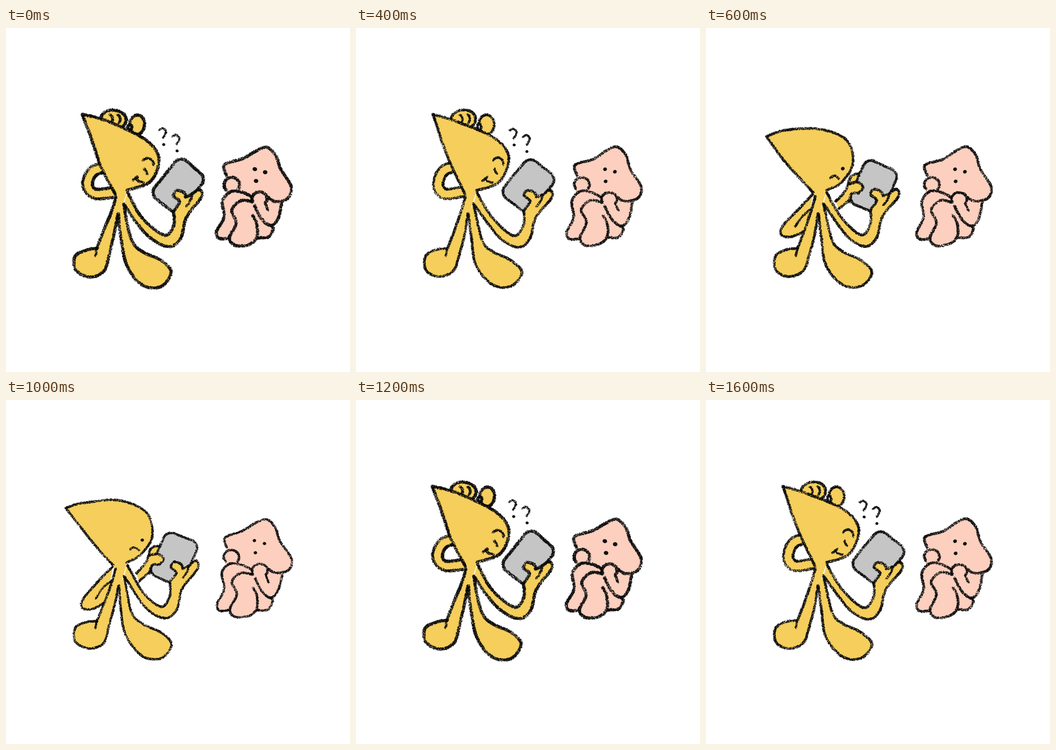
These frames come from a looping animation (715 by 715 pixels, 1.8 s). An HTML page with a canvas:

```html
<!DOCTYPE html>
<html lang="en">
<head>
<meta charset="utf-8">
<title>Puzzled by a phone</title>
<style>
html, body { margin: 0; width: 100%; height: 100%; overflow: hidden; background: #fff; }
canvas { display: block; width: 100vw; height: 100vh; }
</style>
</head>
<body>
<canvas id="stage" width="715" height="715"></canvas>
<script>
const SIZE = 715, STEP = 200, TAU = Math.PI * 2;
const YELLOW = '#f5ce5c', PINK = '#fccfbe', GREY = '#c5c5c5', WHITE = '#fff';

let seed = 1;
function rand() {
  seed = (seed + 0x6d2b79f5) | 0;
  let t = Math.imul(seed ^ (seed >>> 15), 1 | seed);
  t = (t + Math.imul(t ^ (t >>> 7), 61 | t)) ^ t;
  return ((t ^ (t >>> 14)) >>> 0) / 4294967296;
}

// Smooth curve through "x,y x,y ..."; "|" marks a sharp corner.
function curve(text, x0 = 0, y0 = 0) {
  const out = [];
  let last = null;
  for (const part of text.split('|')) {
    const p = part.trim().split(/\s+/).map(s => s.split(',').map(Number));
    if (last) p.unshift(last);
    last = p[p.length - 1];
    for (let i = 0; i < p.length - 1; i++) {
      const b = p[i], c = p[i + 1], a = p[i - 1] || b, d = p[i + 2] || c;
      const n = Math.ceil(Math.hypot(c[0] - b[0], c[1] - b[1]));
      for (let k = 0; k < n; k++) {
        const t = k / n;
        out.push([0, 1].map(j => b[j] + 0.5 * t * (c[j] - a[j] +
          t * (2 * a[j] - 5 * b[j] + 4 * c[j] - d[j] + t * (3 * (b[j] - c[j]) + d[j] - a[j])))));
      }
    }
  }
  out.push(last);
  return out.map(([x, y]) => [x + x0, y + y0]);
}

function arc(cx, cy, rx, ry, from = 0, to = TAU) {
  const n = Math.ceil(Math.max(rx, ry) * (to - from));
  return Array.from({ length: n + 1 }, (_, i) => {
    const a = from + (to - from) * i / n;
    return [cx + rx * Math.cos(a), cy + ry * Math.sin(a)];
  });
}

// Rounded rectangle, turned about its centre.
function roundBox(cx, cy, w, h, r, angle) {
  const out = [], cos = Math.cos(angle), sin = Math.sin(angle);
  [[1, 1], [-1, 1], [-1, -1], [1, -1]].forEach(([sx, sy], i) => {
    out.push(...arc(sx * (w / 2 - r), sy * (h / 2 - r), r, r, i * TAU / 4, (i + 1) * TAU / 4));
  });
  out.push(out[0]);
  return out.flatMap((p, i) => {
    const q = out[i + 1] || p, n = Math.max(1, Math.round(Math.hypot(q[0] - p[0], q[1] - p[1])));
    return Array.from({ length: n }, (_, k) => {
      const x = p[0] + (q[0] - p[0]) * k / n, y = p[1] + (q[1] - p[1]) * k / n;
      return [cx + x * cos - y * sin, cy + x * sin + y * cos];
    });
  });
}

// One edge of a limb, at a distance from its centre line.
function edge(points, distance) {
  return points.map(([x, y], i) => {
    const a = points[Math.max(0, i - 2)], b = points[Math.min(points.length - 1, i + 2)];
    const dx = b[0] - a[0], dy = b[1] - a[1], len = Math.hypot(dx, dy) || 1;
    return [x - dy / len * distance, y + dx / len * distance];
  });
}

// Moves the far end of an arm while the shoulder stays put.
function swing(points, dx, dy) {
  return points.map(([x, y]) => {
    const k = Math.min(1, Math.max(0, (x - 250) / 100));
    return [x + dx * k, y + dy * k];
  });
}

function makePen(g, { width, density, phase }) {
  const boil = ([x, y]) => [
    x + 0.8 * Math.sin(y / 23 + x / 41 + phase),
    y + 0.8 * Math.sin(x / 19 - y / 37 + phase)
  ];

  function fill(points, color) {
    g.fillStyle = color;
    g.beginPath();
    points.map(boil).forEach(p => g.lineTo(...p));
    g.fill();
  }
  // Crayon line: grains scattered across the stroke, thinner in patches.
  function line(points, w = width) {
    const start = rand() * TAU;
    g.fillStyle = 'rgba(12,12,12,.84)';
    points.map(boil).forEach(([x, y], i) => {
      const patch = 0.84 + 0.24 * Math.sin(i / 17 + start) + 0.14 * Math.sin(i / 6.3);
      for (let k = w * 1.2 * density * patch; k > 0; k--) {
        const r = w / 2 * Math.sqrt(rand()), a = rand() * TAU, s = 1 + rand() * 0.6;
        g.fillRect(x + r * Math.cos(a) - s / 2, y + r * Math.sin(a) - s / 2, s, s);
      }
    });
  }
  function shape(points, color) {
    fill(points, color);
    line(points);
  }
  function tube(centre, thickness, color) {
    const sides = [edge(centre, thickness / 2), edge(centre, -thickness / 2)];
    fill([...sides[0], ...[...sides[1]].reverse()], color);
    sides.forEach(side => line(side));
  }
  const detail = points => line(points, width * 0.85);
  const dot = (x, y, r = width * 0.68) => fill(arc(x, y, r, r * 0.92), '#111');
  return { fill, line, shape, tube, detail, dot };
}

function drawLegs(pen) {
  pen.fill(curve('223,338 | 252,338 | 234,392 | 223,338'), YELLOW);
  pen.shape(curve('228,350 220,378 206,416 189,459 | 168,461 144,474 145,503 173,517 203,505 215,468 226,425 233,386'), YELLOW);
  pen.detail(curve('189,459 186,474'));
  pen.shape(curve('234,386 239,436 250,492 283,533 322,537 344,508 322,483 284,465 261,440 245,366'), YELLOW);
}

function drawPhoneArm(pen, dx, dy) {
  const arm = curve('252,342 285,397 328,431 348,410 348,380 | 361,361 349,349 356,338 371,343 374,352 | 387,346 402,336 406,352 374,394 362,438 336,455 293,431 245,366');
  pen.shape(swing(arm, dx, dy), YELLOW);
  pen.detail(swing(curve('387,346 384,358 375,371'), dx, dy));
  pen.fill(curve('227,338 | 247,338 | 236,367 | 227,338'), YELLOW);
}

const drawPhone = (pen, x, y, angle) => pen.shape(roundBox(x, y, 73, 99, 17, angle), GREY);

function drawScratchingHand(pen) {
  pen.shape(arc(272, 201, 16, 20), YELLOW);
  pen.shape(arc(257, 206, 4, 6), WHITE);
  pen.shape(arc(223, 190, 26, 20), YELLOW);
  for (const x of [212, 228]) pen.detail(arc(x, 189, 9, 10, -1.2, 0.9));
}

function drawPuzzled(pen) {
  pen.tube(curve('204,289 180,299 170,326 184,344 223,341'), 20, YELLOW);
  drawLegs(pen);
  drawScratchingHand(pen);
  pen.shape(curve('227,346 197,285 159,180 | 210,194 285,228 317,268 300,318 251,338'), YELLOW);
  drawPhone(pen, 358.5, 327.5, 0.68);
  drawPhoneArm(pen, 0, 0);

  pen.detail(arc(294, 283, 12, 13, -2.5, 0.1));
  for (const stroke of ['287,292 293,303', '263,317 273,309', '268,312 276,319 285,321']) pen.detail(curve(stroke));
  for (const i of [0, 1]) {
    const x = 326 + 27 * i, y = 211 + 13 * i;
    pen.line(curve('-7,2 0,-2 7,3 6,10 1,18', x, y), 4.4);
    pen.dot(x + 2, y + 32, 3.2);
  }
}

function drawWorried(pen) {
  pen.shape(curve('223,346 194,375 161,411 157,431 178,434 207,420'), YELLOW);
  pen.detail(curve('219,376 201,391 186,412'));
  drawLegs(pen);
  pen.shape(curve('270,360 291,337 302,309 320,303 | 323,320 299,356 | 276,376'), YELLOW);
  pen.shape(curve('223,343 175,291 125,225 | 165,213 232,209 291,233 305,283 281,321 251,337'), YELLOW);
  drawPhone(pen, 348.5, 330, 0.41);
  pen.shape(curve('297,324 316,321 327,331 318,343 | 303,344 298,361'), YELLOW);
  drawPhoneArm(pen, -7, -2);
  pen.detail(curve('258,311 267,306 277,313'));
  pen.dot(284, 292);
}

function drawCurled(pen) {
  pen.fill(curve('462,308 545,340 573,365 551,412 550,430 500,443 470,436 455,365 462,308'), PINK);
  pen.shape(curve('522,436 545,435 555,418 550,410'), PINK);
  pen.shape(curve('511,352 490,342 466,340 449,360 453,393 438,424 444,438 466,437'), PINK);
  pen.shape(curve('517,370 532,398 551,411 566,396 574,363'), PINK);
  pen.shape(curve('511,362 488,359 469,378 479,405 465,436 478,452 508,448 522,432 521,405 513,390'), PINK);
  pen.shape(curve('459,307 455,285 492,272 522,254 543,248 561,266 570,293 593,330 586,354 560,360 545,352'), PINK);
  pen.shape(arc(469, 326, 16, 15, 2.4, TAU + 0.7), PINK);
  pen.shape(arc(527, 355, 16, 14, 2.6, TAU + 0.7), PINK);
  pen.detail(curve('539,363 545,379'));
  for (const [x, y] of [[517, 293], [538, 299], [519, 318]]) pen.dot(x, y);
}

function drawing(drawPose, style) {
  const layer = document.createElement('canvas');
  layer.width = layer.height = SIZE;
  const g = layer.getContext('2d');
  g.fillStyle = WHITE;
  g.fillRect(0, 0, SIZE, SIZE);
  const pen = makePen(g, style);
  drawPose(pen);
  drawCurled(pen);
  return layer;
}

const bold = { width: 6.8, density: 1.1, phase: 0 };
const soft = { width: 5.8, density: 0.95, phase: 2 };
const thin = { width: 5.2, density: 0.95, phase: 4 };

const think = [bold, thin, soft].map(style => drawing(drawPuzzled, style));
const fret = [soft, bold, thin].map(style => drawing(drawWorried, style));
const reel = [...think, ...fret, ...think];

const stage = document.getElementById('stage').getContext('2d');
const start = performance.now();
function show(now) {
  const elapsed = Math.max(0, now - start);
  stage.drawImage(reel[Math.floor(elapsed / STEP) % reel.length], 0, 0);
  requestAnimationFrame(show);
}
show(start);
</script>
</body>
</html>
```
